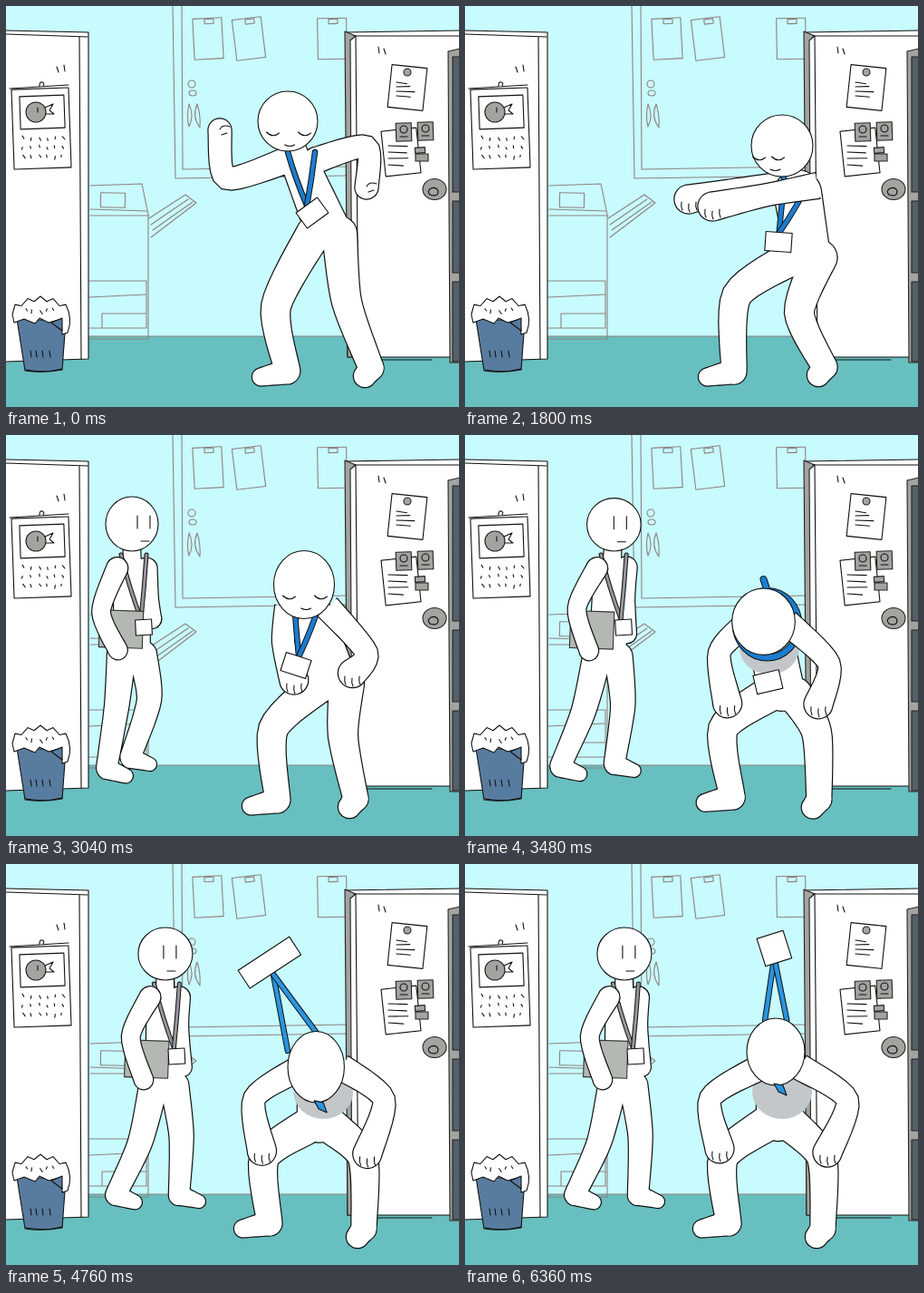
Write an HTML page that moves like this. It is 500 px wide and 442 px high and loops after 6440 ms.

```html
<!DOCTYPE html>
<html lang="en">
<head>
<meta charset="utf-8">
<title>Office dance</title>
<style>
html,body{margin:0;width:100%;height:100%;overflow:hidden;background:#c8fbfe}
svg{display:block;width:100vw;height:100vh}
path,ellipse{stroke-linejoin:round;stroke-linecap:round;stroke-width:1.1}
.ink{fill:none;stroke:#111}
.white{fill:#fff;stroke:#111}
.grey{fill:#a3a39f;stroke:#222}
.shade{fill:#c3c7ca}
.folder{fill:#b3b8b2;stroke:#333}
.slate{fill:#566069;stroke:#222}
.bin{fill:#587c9f;stroke:#111}
.faint{fill:none;stroke:#8d827f}
</style>
</head>
<body>
<svg viewBox="0 0 500 442" preserveAspectRatio="none">
  <path fill="#c8fbfe" d="M0 0H500V442H0z"/>
  <path fill="#68bfbf" d="M0 364H500V442H0z"/>
  <g id="back"></g>
  <g id="colleague"></g>
  <g id="front"></g>
  <g id="dancer"></g>
</svg>
<script>
const LOOP = 6440, STEP = 40, LAST = 6360;
const SPIN_START = 4520, SPIN_TURN = 409, SPIN_RIGHT = 5440;
const BLUE = '#1c7ccf';
const $ = id => document.getElementById(id);
const f = n => n.toFixed(1);
const xy = (x, y) => f(x) + ' ' + f(y);
const add = ([x, y], dx, dy) => [x + dx, y + dy];

// ---- drawing helpers ----
const path = (d, cls = 'ink') => `<path class="${cls}" d="${d}"/>`;
const oval = (x, y, rx, ry = rx, cls = 'white') =>
  `<ellipse class="${cls}" cx="${f(x)}" cy="${f(y)}" rx="${f(rx)}" ry="${f(ry)}"/>`;
const at = (x, y, deg, body) => `<g transform="translate(${xy(x, y)}) rotate(${f(deg)})">${body}</g>`;
const box = (x, y, w, h, deg = 0, cls = 'white') =>
  at(x, y, deg, path(`M${-w / 2} ${-h / 2}h${w}v${h}h${-w}z`, cls));

let seed = 7;
const random = () => (seed = seed * 16807 % 2147483647) / 2147483647;
function writing(x, y, width, rows, gap) {
  let d = '';
  for (let r = 0; r < rows; r++) d += `M${x} ${y + r * gap}l${f(width * (.5 + random() / 2))} ${f(random() * 3 - 1)}`;
  return path(d);
}
function ticks(x, y, cols, rows, dx, dy) {
  let d = '';
  for (let r = 0; r < rows; r++) for (let c = 0; c < cols; c++)
    d += `M${f(x + c * dx + random() * 3)} ${f(y + r * dy + random() * 3)}l${f(random() * 4 - 1)} ${f(2 + random() * 2)}`;
  return path(d);
}

// ---- room ----
function drawRoom() {
  const pinned = (x, deg) => box(x, 36, 32, 45, deg, 'faint') + box(x + 1, 17, 10, 5, deg, 'faint');
  const wall = path('M91 364H376M184 0L187 190L376 187M194 0L195 180L376 177', 'faint') +
    pinned(223, -3) + pinned(268, -7) + pinned(360, -1) +
    oval(205, 86, 4, 4, 'faint') + oval(206, 96, 4, 3, 'faint') +
    path('M202 108q-3 14 0 25q6-12 0-25M211 108q-6 14 3 26q1-14-3-26', 'faint');
  const copier = path('M93 198L150 196L157 230V367H92M93 224L156 226M93 231H158M92 303H155V355H92M92 321L154 318M106 339H155M106 339v16', 'faint') +
    box(118, 214, 27, 16, 1, 'faint') +
    path('M158 234L198 208L210 217L160 255M160 241L201 213M162 247L206 216', 'faint');

  const note = (x, y) => box(x, y, 17, 20, -2, 'grey') + oval(x, y - 3, 4, 4, 'ink') + path(`M${x - 4} ${y + 5}h8`);
  const panes = [[56, 205], [215, 294], [304, 392]]
    .map(([top, end]) => path(`M493 ${top}H501V${end}H493z`, 'slate')).join('');
  const door = path('M376 29L501 27V387H377z', 'white') +
    path('M374 28L386 33L380 38L382 387H377z', 'grey') +
    path('M384 33H500M386 34L389 387M390 390H470M411 45l1 7M417 47l2 6') +
    path('M488 50L501 47V393H490z', 'grey') + panes +
    box(443, 90, 39, 47, 6) + writing(431, 84, 23, 4, 5) + oval(443, 73, 4, 4, 'grey') +
    box(436, 161, 39, 50, -6) + writing(422, 154, 24, 4, 7) +
    note(439, 139) + note(463, 138) + box(457, 159, 11, 6, -4, 'grey') + box(459, 167, 14, 8, 0, 'grey') +
    oval(473, 202, 13, 11.5, 'grey') + path('M468 208q9 3 9-4q-2-5-8-3q-5 3-1 7');
  $('back').innerHTML = wall + copier + door;

  const calendar = box(39, 135, 63, 88, -2) + box(40, 117, 49, 36, -2) +
    path('M4 91L69 87M37 88q0-5 3-4q3 1 1 4') +
    path('M43 112l9-4-4 7 5 4h-10z', 'white') + oval(33, 117, 11, 11, 'grey') + path('M35 112v5') +
    ticks(16, 143, 6, 3, 9, 10);
  let paper = 'M7 340';
  for (let i = 0; i < 9; i++) paper += `L${10 + i * 7} ${f(333 - 11 * Math.sin((i + .5) / 9 * Math.PI) + (i % 2 ? 3 : -2))}`;
  const bin = path('M12 345L66 347L62 401Q40 405 21 402z', 'bin') +
    path(paper + 'Q74 345 68 360L62 362L61 345L47 349L37 344L32 350L20 345L9 349z', 'white') +
    path('M50 349L62 344V358z', 'bin') + ticks(19, 333, 5, 1, 8, 0) +
    path([27, 33, 40, 48].map(x => `M${x} 380l1 7`).join('') + 'M22 401q20 4 40-1');
  $('front').innerHTML = path('M-2 27L91 29V389L-2 392z', 'white') +
    path('M0 31L90 34M81 34L83 389M56 67l2 6M64 65l1 7') + calendar + bin;
}

// ---- poses: joints only; shoulders, hip sockets, feet and widths follow by rule ----
const point = {
  lean: [0], bowed: [0], look: [1], badge: [338, 228, -36], head: [311, 127, 33, 33],
  chest: [326, 170], hips: [354, 244],
  elbowL: [243, 190], handL: [236, 137], elbowR: [398, 155], handR: [398, 200],
  kneeL: [298, 331], footL: [311, 403], kneeR: [376, 326], footR: [403, 399]
};
const wave = {
  ...point, badge: [321, 228, -2], head: [320, 120, 33, 33], chest: [325, 163], hips: [340, 246],
  elbowL: [252, 172], handL: [248, 222], elbowR: [400, 155], handR: [403, 119],
  kneeL: [300, 326], kneeR: [390, 318], footR: [393, 402]
};
const reach = {
  ...point, lean: [1], look: [-15], badge: [346, 260, 4], head: [350, 154, 34, 34],
  chest: [367, 198], hips: [378, 270],
  elbowL: [296, 203], handL: [247, 213], elbowR: [334, 208], handR: [273, 221],
  kneeL: [300, 319], footL: [297, 403], kneeR: [369, 338], footR: [397, 398]
};
const crouch = {
  ...reach, look: [1], badge: [320, 254, 18], head: [329, 165, 33.5, 37.5], chest: [333, 190], hips: [362, 268],
  elbowL: [306, 228], handL: [318, 271], elbowR: [398, 240], handR: [382, 263],
  kneeL: [295, 324], footL: [300, 403], kneeR: [372, 332], footR: [386, 401]
};
const knees = {
  ...reach, bowed: [1], badge: [353, 288, -40], head: [336, 241, 36, 36], chest: [341, 222], hips: [345, 290],
  elbowL: [265, 250], handL: [271, 317], elbowR: [411, 262], handR: [403, 326],
  kneeL: [276, 324], footL: [291, 396], kneeR: [402, 324], footR: [395, 402]
};
const bow = {
  ...knees, head: [340, 267, 29, 45], chest: [349, 224],
  elbowL: [283, 258], handL: [286, 322], elbowR: [404, 258], handR: [395, 325], kneeL: [285, 324], kneeR: [394, 324]
};
const lift = {
  ...bow, head: [343, 207, 32, 37], chest: [348, 224], hips: [346, 281],
  elbowL: [271, 258], handL: [281, 314], elbowR: [422, 260], handR: [400, 318]
};
const stepIn = {
  head: [139, 98, 29, 30], look: [13], lean: [0], chest: [139, 146], hips: [139, 236],
  elbowL: [105, 195], handL: [124, 238], elbowR: [158, 180], handR: [161, 203],
  kneeL: [122, 300], footL: [111, 368], kneeR: [158, 292], footR: [137, 356]
};
const stride = {
  head: [190, 99, 30, 29], look: [5], lean: [0], chest: [187, 146], hips: [181, 238],
  elbowL: [147, 190], handL: [159, 239], elbowR: [201, 180], handR: [202, 225],
  kneeL: [151, 307], footL: [121, 365], kneeR: [197, 300], footR: [191, 365]
};
// Tips the whole figure backwards around its feet
const tipBack = (pose, dx) => Object.fromEntries(Object.entries(pose).map(([k, v]) =>
  [k, v.length > 1 ? [v[0] - dx * (365 - v[1]) / 265, ...v.slice(1)] : v]));
const stare = tipBack(stride, 14);

// time, pose, sideways sway
const dance = [
  [0, point], [320, wave], [640, point], [960, wave], [1280, point], [1640, reach],
  [1800, reach], [2000, reach, -6], [2160, reach], [2560, crouch], [2800, crouch, -7],
  [3040, crouch], [3260, crouch, -7], [3680, knees], [3860, bow], [4040, knees], [4280, bow]
];
for (let i = 0; i < 20; i++)
  dance.push([SPIN_START + i * SPIN_TURN / 4, [knees, bow, lift, bow][i % 4]]);
const walk = [
  [2340, stride, -150], [2700, stride, -78], [3040, stepIn], [3380, stride, -30],
  [3700, stepIn, 40], [4040, stride], [4500, stare], [LOOP, stare]
];

function poseAt(keys, t) {
  let i = 0;
  while (i < keys.length - 2 && t >= keys[i + 1][0]) i++;
  const [t0, a, swayA = 0] = keys[i], [t1, b, swayB = 0] = keys[i + 1];
  const u = Math.min(1, Math.max(0, (t - t0) / (t1 - t0))), e = u * u * (3 - 2 * u);
  const mix = (p, q) => p + (q - p) * e, pose = {};
  for (const k in a) {
    const planted = keys === dance && /knee|foot/.test(k);
    pose[k] = a[k].map((v, n) => mix(v, b[k][n]) + (n || a[k].length < 2 || planted ? 0 : mix(swayA, swayB)));
  }
  return pose;
}

// ---- figures ----
// Outline of a tapering limb along a smooth line through [x, y, half-width]
function limb(points, closed = true) {
  const n = points.length, line = [], K = 8, T = .38;
  const get = (i, j) => points[Math.max(0, Math.min(n - 1, i))][j];
  for (let s = 0; s <= (n - 1) * K; s++) {
    const i = Math.min(n - 2, Math.floor(s / K)), u = s / K - i, v = 1 - u;
    line.push([0, 1, 2].map(j => {
      const a = get(i, j), b = get(i + 1, j);
      const m0 = (b - get(i - 1, j)) * T, m1 = (get(i + 2, j) - a) * T;
      return a * v * v * (1 + 2 * u) + b * u * u * (3 - 2 * u) + m0 * u * v * v - m1 * u * u * v;
    }));
  }
  const left = [], right = [];
  line.forEach(([x, y, w], i) => {
    const a = line[Math.max(0, i - 1)], b = line[Math.min(line.length - 1, i + 1)];
    const dx = b[0] - a[0], dy = b[1] - a[1], s = w / (Math.hypot(dx, dy) || 1);
    left.push(xy(x + dy * s, y - dx * s));
    right.unshift(xy(x - dy * s, y + dx * s));
  });
  const cap = (w, to) => `A${f(w)} ${f(w)} 0 0 1 ${to}`;
  return 'M' + left.join('L') + cap(line.at(-1)[2], right[0]) + 'L' + right.join('L') +
    (closed ? cap(line[0][2], left[0]) + 'Z' : '');
}

// All outlines lie below all fills, so the shapes merge into one silhouette
const merge = shapes => `<path d="${shapes.join('')}" fill="none" stroke="#111" style="stroke-width:2.4"/>` +
  shapes.map(d => `<path d="${d}" fill="#fff"/>`).join('');

function figure(p, girth, toes) {
  const lean = p.lean[0], spread = 16 + 6 * lean;
  const arm = side => {
    const hand = (12.5 + 3 * lean) * girth, s = side === 'L' ? -1 : 1;
    return limb([[...add(p.chest, s * spread, 0), 14 * girth], [...p['elbow' + side], 12 * girth], [...p['hand' + side], hand]], !lean);
  };
  const leg = (side, i) => {
    const foot = p['foot' + side], [dx, dy, r] = toes[i];
    return [
      limb([[...add(p.hips, (i ? 14 : -14) * girth, 6), 19 * girth], [...p['knee' + side], 16 * girth], [...foot, 13.5 * girth]]),
      limb([[...foot, 13.5 * girth], [...add(foot, dx, dy), r]])
    ];
  };
  const torso = limb([[...add(p.chest, 0, 8), spread + 4], [...p.hips, 24 * girth]]);
  const neck = limb([[p.head[0], p.head[1], 8], [...p.chest, 10]]);
  return { body: [neck, torso, ...leg('R', 1), ...leg('L', 0)], armL: arm('L'), armR: arm('R') };
}

function strap(d, color, width = 6.5) {
  return `<path d="${d}" fill="none" stroke="#111" style="stroke-width:${width}"/>
    <path d="${d}" fill="none" stroke="${color}" style="stroke-width:${width - 2}"/>`;
}
const vee = (from, half, to, color, width) => [-1, 1].map(k =>
  strap(`M${xy(from[0] + half * k, from[1])}Q${xy((from[0] + half * k) * .6 + to[0] * .4, (from[1] + to[1]) / 2)} ${xy(...to)}`, color, width)).join('');

function hangingLanyard({ head, chest, badge: [x, y, deg], bowed }) {
  const a = deg * Math.PI / 180, card = box(x, y, 29, 21, deg);
  if (bowed[0] < .5) return vee(add(chest, 0, -9), 15, [x + 10 * Math.sin(a), y - 10 * Math.cos(a)], BLUE) + card;
  const [hx, hy, rx, ry] = head, cx = hx + 4, cy = hy + 3;
  const loop = `M${xy(cx - rx, cy)}a${f(rx)} ${f(ry)} 0 1 1 ${f(2 * rx)} 0a${f(rx)} ${f(ry)} 0 1 1 ${f(-2 * rx)} 0`;
  return strap(loop, BLUE, 8) + strap(`M${xy(hx, hy - ry - 10)}l4 12`, BLUE, 8) + card;
}

function spinningLanyard(t, [hx, hy]) {
  const angle = (t - SPIN_RIGHT) / SPIN_TURN * 2 * Math.PI;
  const c = Math.cos(angle), s = Math.sin(angle), side = Math.abs(c);
  const tip = [341 + 88 * c, 231 - (s > 0 ? 128 : 50) * s];
  const reach = 35 - 11 * side, spread = 12 + 13 * side;
  const bands = [-1, 1].map(k => {
    const from = xy(hx + c * reach + s * spread * k, hy - 5 * side - s * reach + c * spread * k);
    return strap(`M${from}L${xy(...tip)}`, '#2b94e0');
  }).join('');
  // The card smears along its path where it moves fastest
  const long = 15 + 36 * side, wide = 16 - 8 * side, blurred = side > .7;
  const card = blurred
    ? `<path d="M0 ${f(-long)}Q${f(wide * 2)} 0 0 ${f(long)}Q${f(-wide * 2)} 0 0 ${f(-long)}Z" fill="#fff" stroke="#999"/>`
    : box(0, 0, wide * 2, long * 2);
  const deg = -angle * 180 / Math.PI + 13 * side - 18 * (1 - side);
  return bands + at(tip[0] + c * 8, tip[1] - s * 10 - 9 * side, deg, card);
}

function closedEyes([x, y], look) {
  const gap = 18 - Math.abs(look) * .5;
  const lid = k => `M${f(look + k * gap - 7)} 12q7 7 14 1`;
  return at(x, y, 0, path(lid(-1) + lid(1) + `M${f(look * .6 - 4)} 26q6 3 11 0`));
}
function hand([x, y], lean) {
  const lines = lean > .5 ? [-8, 0, 8].map(k => `M${k} ${5 - Math.abs(k) / 4}q-1 5 1 9`).join('') : 'M0-1q3-6 11-3M2 5l6-2';
  return at(x, y, 0, path(lines));
}

function drawDancer(t) {
  const p = poseAt(dance, t), { body, armL, armR } = figure(p, 1, [[-30, 6, 9.5], [-7, 9, 12]]);
  const lean = p.lean[0], [hx, hy, rx, ry] = p.head;
  const spinning = t >= SPIN_START, bowed = p.bowed[0] > .5;
  const left = merge([armL]) + hand(p.handL, lean), right = merge([armR]) + hand(p.handR, lean);
  const lanyard = spinning ? spinningLanyard(t, p.head) : hangingLanyard(p);
  const shade = bowed ? oval(p.chest[0] + 2, p.chest[1] + 27, 33, 30, 'shade') : '';
  const upper = lean < .5
    ? merge([...body, armL, armR]) + hand(p.handL, lean) + hand(p.handR, lean) + lanyard
    : merge(body) + shade + left + (spinning ? right + lanyard : lanyard + right);
  const tail = spinning ? at(hx - 2, hy + ry - 2, 0, `<path d="M0 0l5 9 9 4-4-11z" fill="#2b94e0" stroke="#111"/>`) : '';
  $('dancer').innerHTML = upper + oval(hx, hy, rx, ry) + (bowed ? tail : closedEyes(p.head, p.look[0]));
}

function drawColleague(t) {
  if (t < walk[0][0]) { $('colleague').innerHTML = ''; return; }
  const p = poseAt(walk, t), { body, armL, armR } = figure(p, .82, [[22, 8, 7.5], [22, 7, 7]]);
  const card = add(p.chest, 13, 66), look = p.look[0];
  $('colleague').innerHTML = merge([...body, armR]) +
    vee(add(p.chest, 2, -14), 14, add(card, -3, -9), '#96979a', 5) +
    box(p.handL[0] + 3, p.handL[1] - 24, 48, 41, 2, 'folder') + merge([armL]) + box(...card, 18, 17, -3) +
    oval(...p.head) +
    at(p.head[0], p.head[1], 0, path(`M${f(look - 7)}-9v14M${f(look + 7)}-9v14M${f(look - 3)} 19h9`));
}

function render(now) {
  const t = Math.min(LAST, Math.floor(now % LOOP / STEP) * STEP);
  drawColleague(t);
  drawDancer(t);
}

let start;
function tick(now) {
  start ??= now;
  render(now - start);
  requestAnimationFrame(tick);
}
drawRoom();
render(0);
requestAnimationFrame(tick);
</script>
</body>
</html>
```
